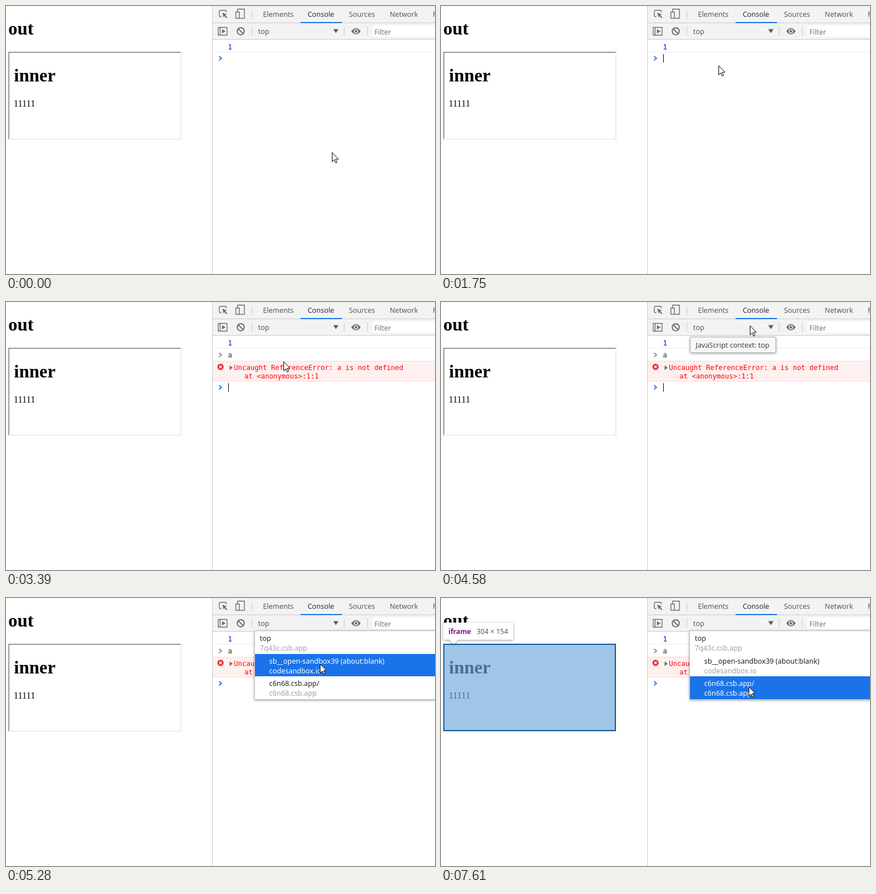
Animation, 753 px wide and 469 px high, one loop 8 s. Source, as an HTML page:

```html
<!DOCTYPE html>
<html lang="en">
<head>
<meta charset="utf-8">
<title>Console context</title>
<style>
  html, body { margin: 0; height: 100%; overflow: hidden; background: #fff; }
  svg { display: block; width: 100%; height: 100%; }
  text { font: 12.4px "Noto Sans", "Open Sans", sans-serif; fill: #5a5a5a; white-space: pre; }
  .page { font: 16px "Liberation Serif", serif; fill: #000; }
  .head { font: bold 32px "Liberation Serif", serif; fill: #000; }
  .mono text { font: 12.05px "DejaVu Sans Mono", monospace; fill: #222; }
  .mono .num { fill: #1c00cf; }
  .mono .err { fill: #f00; }
  .icon { fill: none; stroke: #6e6e6e; stroke-width: 1.4; }
  .sep { stroke: #ccc; }
  .item text { fill: #222; }
  .item text + text { fill: #a0a0a0; }
  .item rect { fill: none; }
  .item.on rect { fill: #1a73e8; }
  .item.on text { fill: #fff; }
  .pop { filter: drop-shadow(0 1px 2px #0006); }
</style>
</head>
<body>
<svg viewBox="0 0 753 469">
  <rect width="753" height="469" fill="#fff"/>

  <!-- page -->
  <text class="head" x="4" y="50">out</text>
  <path d="M4 234V80H308L306 82H6V232Z" fill="#9a9a9a"/>
  <path d="M308 80V234H4L6 232H306V82Z" fill="#ededed"/>
  <text class="head" x="14" y="132">inner</text>
  <text class="page" x="13.5" y="176">11111</text>
  <g id="overlay">
    <rect x="4" y="80" width="303" height="153" fill="#6fa8dc" opacity=".66"/>
    <rect x="5" y="81" width="301" height="151" fill="none" stroke="#125a96" stroke-width="2"/>
    <path class="pop" d="M6 43H125Q127 43 127 45V71Q127 73 125 73H30L22.500 81 15 73H6Q4 73 4 71V45Q4 43 6 43Z" fill="#fff"/>
    <text x="13" y="63" style="font-weight:bold;font-size:12px;fill:#881280">iframe</text>
    <text x="62.500" y="63" style="font-size:12.2px">304 × 154</text>
  </g>

  <!-- toolbars -->
  <rect x="362" width="391" height="58" fill="#f3f3f3"/>
  <path class="sep" d="M362 29.500H753M362 58.500H753M362.500 0V469M431.500 7V22M431.500 36V52M593.500 36V52M634.500 36V52"/>
  <rect x="517" y="28" width="73" height="2" fill="#1a73e8"/>
  <rect x="643" y="34" width="110" height="20" fill="#fff"/>
  <text x="451" y="19">Elements</text>
  <text x="529.500" y="19" style="fill:#333">Console</text>
  <text x="602" y="19">Sources</text>
  <text x="673.500" y="19">Network</text>
  <text x="749" y="19">Performance</text>
  <text x="442.500" y="49" style="fill:#456078">top</text>
  <text x="646.500" y="50" style="fill:#757575">Filter</text>
  <g class="icon">
    <path d="M378 18.500H375.500Q374.500 18.500 374.500 17.500V8.500Q374.500 7.500 375.500 7.500H385.500Q386.500 7.500 386.500 8.500V11"/>
    <path d="M379.500 11.500L388 15 384.700 16.200 388.500 20 387 21.500 383.300 17.600 382 20.500Z" fill="#6e6e6e" stroke="none"/>
    <path d="M406.500 10V5.500H418.500V21.500H410M403.500 10.500H409.500V21.500H403.500Z"/>
    <path d="M372.500 37.500H388V51H372.500ZM375.700 37.500V51"/>
    <path d="M379 40.500L385.500 44.300 379 48Z" fill="#6e6e6e" stroke="none"/>
    <path d="M407.500 39.700L416.500 48.700" stroke-width="2"/>
    <circle cx="412" cy="44.200" r="6.200" stroke-width="2"/>
    <path d="M606 44.200Q614 33.500 622.500 44.200 614 55 606 44.200Z" fill="#6e6e6e" stroke="none"/>
    <circle cx="614.200" cy="44.200" r="3" fill="#6e6e6e" stroke="#f3f3f3"/>
  </g>
  <path d="M574.500 40.500H583.500L579 47.500Z" fill="#5a5a5a"/>

  <!-- console -->
  <g class="mono">
    <text class="num" x="389.500" y="76">1</text>
    <path d="M363 80.500H753" stroke="#f0f0f0"/>
    <g id="result">
      <path class="icon" d="M374 89L378.500 92.500 374 96"/>
      <text x="389.500" y="97">a</text>
      <rect x="363" y="103" width="390" height="36" fill="#fff0f0"/>
      <path d="M363 103.500H753M363 138.500H753" stroke="#ffd6d6"/>
      <circle cx="376.500" cy="113.500" r="5.500" fill="#e5343b"/>
      <path d="M374.300 111.300L378.700 115.700M378.700 111.300L374.300 115.700" stroke="#fff" stroke-width="1.400"/>
      <path d="M392.500 111V119L398 115Z" fill="#6e6e6e"/>
      <text class="err" x="400" y="119">Uncaught ReferenceError: a is not defined</text>
      <text class="err" x="418.500" y="134">at &lt;anonymous&gt;:1:1</text>
    </g>
    <g id="prompt">
      <path d="M374 88L378.300 91.500 374 95" fill="none" stroke="#1a73e8" stroke-width="1.700"/>
      <text id="typed" x="389.500" y="96">a</text>
      <rect id="caret" y="84" width="1" height="15" fill="#000"/>
    </g>
  </g>

  <!-- popups -->
  <g id="tip">
    <rect class="pop" x="437.500" y="61.500" width="150" height="27" rx="1.500" fill="#f7f7f7" stroke="#b5b5b5"/>
    <text x="447" y="80" style="fill:#444">JavaScript context: top</text>
  </g>
  <g id="menu">
    <rect class="pop" x="436.500" y="57.500" width="330" height="120" fill="#fff" stroke="#c4c4c4"/>
    <g class="item">
      <rect x="437" y="58" width="316" height="40"/>
      <text x="445.500" y="75">top</text><text x="445.500" y="92">7q43c.csb.app</text>
    </g>
    <g class="item">
      <rect x="437" y="98" width="316" height="39"/>
      <text x="462" y="115">sb__open-sandbox39 (about:blank)</text><text x="462" y="132">codesandbox.io</text>
    </g>
    <g class="item">
      <rect x="437" y="137" width="316" height="40"/>
      <text x="462" y="154">c6n68.csb.app/</text><text x="462" y="171">c6n68.csb.app</text>
    </g>
  </g>

  <path id="mouse" d="M.5.5V16.500L4.200 13 6.700 18.600 9 17.600 6.500 12H11.500Z" fill="#fff" stroke="#000"/>
</svg>
<script>
const LOOP = 8000;
const $ = id => document.getElementById(id);
const items = document.querySelectorAll('.item');

// time, x, y of the pointer, held until the next entry
const pointer = [
  [0, 572, 256], [150, 549, 205], [300, 519, 158], [420, 478, 95], [540, 487, 104],
  [4190, 512, 103], [4310, 536, 98], [4460, 542, 66], [4580, 542, 41],
  [5130, 542, 44], [5280, 551, 115], [7460, 540, 153], [7610, 540, 155]
];
const caretOn = [[690, 1250], [1750, 3110], [3390, 3760], [4190, 4730]];

const within = (t, from, to = LOOP) => t >= from && t < to;
const show = (id, on) => $(id).setAttribute('visibility', on ? 'visible' : 'hidden');

function draw(t) {
  const [, x, y] = pointer.findLast(p => p[0] <= t);
  $('mouse').setAttribute('transform', `translate(${x} ${y})`);

  const typing = within(t, 2000, 3390);
  show('typed', typing);
  show('result', t >= 3390);
  show('caret', caretOn.some(([from, to]) => within(t, from, to)));
  $('caret').setAttribute('x', typing ? 397 : 390);
  $('prompt').setAttribute('transform', `translate(0 ${t < 3390 ? 0 : 58})`);

  show('tip', within(t, 4580, 4730));
  show('menu', t >= 4730);
  show('overlay', t >= 7460);
  const active = t < 5280 ? 0 : t < 7460 ? 1 : 2;
  items.forEach((item, i) => item.classList.toggle('on', i === active));
}

function tick() {
  draw(performance.now() % LOOP);
  requestAnimationFrame(tick);
}
tick();
</script>
</body>
</html>
```
